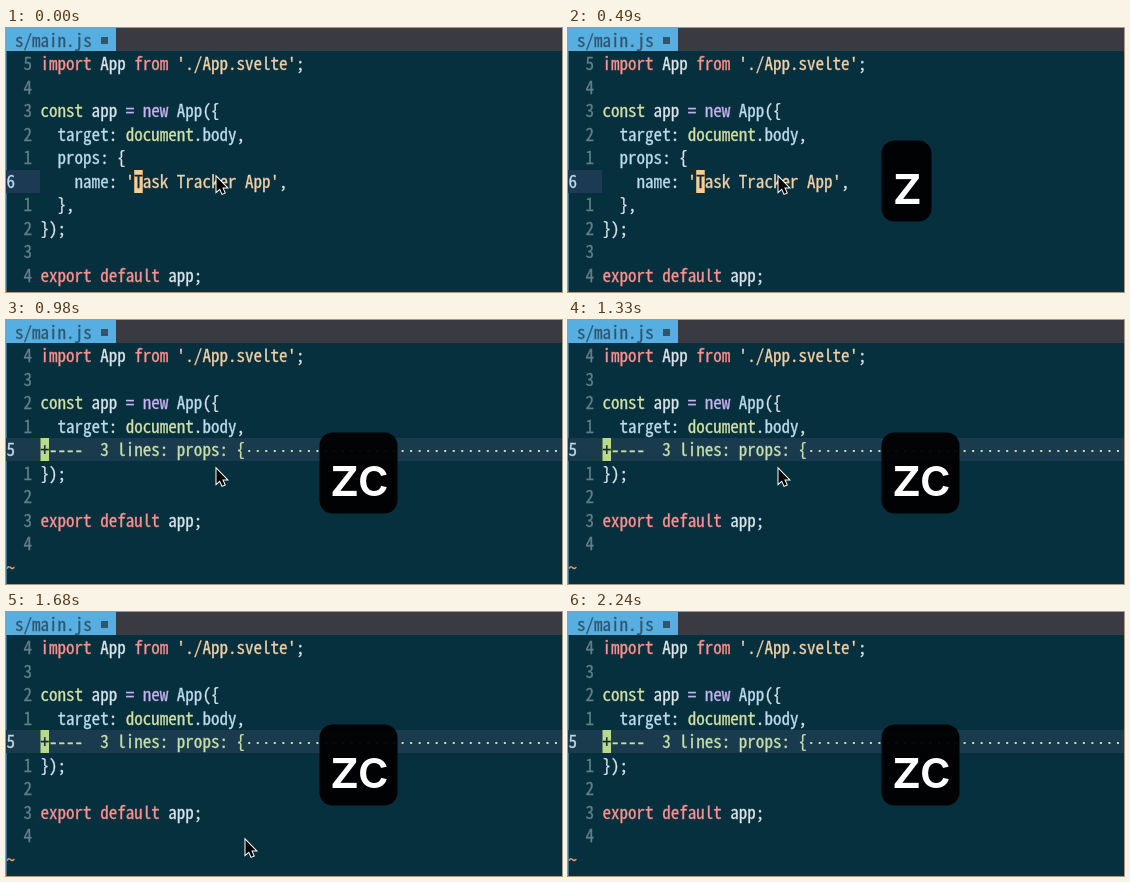
An HTML page with a canvas for the animation above (2.38 s loop, 556x264 px).

```html
<!DOCTYPE html>
<html lang="en">
<head>
<meta charset="utf-8">
<style>
html, body { margin: 0; height: 100%; overflow: hidden; background: #07303f; }
canvas { display: block; }
</style>
</head>
<body>
<canvas id="stage" width="556" height="264"></canvas>
<script>
const ctx = document.getElementById('stage').getContext('2d');
const LOOP = 2380, STEP = 70, CELL = 8.52, ROW = 23.5, LEFT = 34.5, TOP = 24.5;
const KEY_Z = 280, KEY_ZC = 560;

const colors = {
  r: '#ff918e', w: '#dbe4ea', g: '#d3e2a4', o: '#f3d0a4', p: '#c9b2f0',
  b: '#bddbea', n: '#627f8b', f: '#c8e0a8', d: '#10252f', t: '#f0a07a', h: '#2f566d'
};

// Each run of text starts with its colour letter; runs are split by "|".
const head = ["rimport |wApp |rfrom |o'./App.svelte'|w;", '',
  'gconst |wapp |p= new |bApp|w({', 'b  target|w: |gdocument|w.|bbody|w,'];
const tail = ['w});', '', 'rexport default |wapp;'];
const openView = {
  lines: [...head, 'b  props|w: {', "b    name|w: |o'|dT|oask Tracker App'|w,", 'w  },', ...tail],
  current: 5, cursor: [11, '#f5cb98']
};
const foldedView = {
  lines: [...head, 'd+|f----  3 lines: props: {', ...tail, ''],
  current: 4, cursor: [0, '#b9d98c'], folded: true
};

// Pointer stops: time, x, y
const path = [[1330, 210, 148], [1400, 211, 152], [1470, 215, 165], [1540, 222, 185],
  [1610, 231, 208], [1680, 239, 227], [1750, 243, 242], [1820, 245, 252],
  [1890, 247, 258], [1960, 249, 266]];

const family = '"Noto Sans Mono CJK JP", "Noto Sans Mono", monospace';
ctx.font = `100px ${family}`;
const codeFont = `${100 * CELL / ctx.measureText('M').width}px ${family}`;

function rect(x, y, w, h, color) {
  ctx.fillStyle = color;
  ctx.fillRect(x, y, w, h);
}

function write(runs, x, baseline) {
  ctx.font = codeFont;
  ctx.textAlign = 'center';
  ctx.lineWidth = 0.3;
  for (const run of runs.split('|')) {
    ctx.fillStyle = ctx.strokeStyle = colors[run[0]];
    for (const char of run.slice(1)) {
      ctx.fillText(char, x + CELL / 2, baseline);
      ctx.strokeText(char, x + CELL / 2, baseline);
      x += CELL;
    }
  }
}

function drawTabs() {
  rect(0, 0, 556, 23, '#3a3b42');
  rect(0, 0, 110, 23, '#57aee0');
  write('hs/main.js', 9, 19);
  rect(95, 9, 7, 7, colors.h);
}

function drawFoldDots() {
  const start = LEFT + 24 * CELL + CELL / 2 - 1;
  ctx.strokeStyle = colors.f;
  ctx.lineWidth = 2;
  ctx.setLineDash([2, CELL - 2]);
  ctx.beginPath();
  ctx.moveTo(start, 131);
  ctx.lineTo(556, 131);
  ctx.stroke();
  ctx.setLineDash([]);
}

function drawEditor({ lines, current, cursor, folded }) {
  const y = Math.round(TOP + current * ROW - 0.5);
  rect(0, y, folded ? 556 : LEFT - 0.5, 23, folded ? '#1a3b4d' : '#1d3a54');
  rect(LEFT + cursor[0] * CELL, y, CELL, 23, cursor[1]);
  lines.forEach((line, i) => {
    const baseline = TOP + i * ROW + 17.5;
    if (i === current) write('b' + (i + 1), 0.5, baseline);
    else write('n' + Math.abs(i - current), LEFT - 2 * CELL, baseline);
    if (line) write(line, LEFT, baseline);
  });
  if (folded) {
    drawFoldDots();
    write('t~', 0.5, TOP + 9 * ROW + 17.5);
  }
}

function drawKeys(text, width) {
  ctx.fillStyle = 'rgba(0,0,0,.95)';
  ctx.beginPath();
  ctx.roundRect(313.5, 112.5, width, 81, 13);
  ctx.fill();
  ctx.fillStyle = '#fff';
  ctx.font = '500 55px Inter, sans-serif';
  ctx.textAlign = 'center';
  ctx.letterSpacing = '-1.5px';
  ctx.fillText(text, 313.5 + width / 2, 176);
  ctx.letterSpacing = '0px';
}

function drawPointer(t) {
  const [, x, y] = path.findLast(stop => stop[0] <= t) || path[0];
  ctx.save();
  ctx.translate(x + 0.5, y + 1);
  const arrow = new Path2D('M0 0V14.5L3.4 11.4L5.8 16.8L8.1 15.8L5.8 10.6H10.2Z');
  ctx.lineWidth = 2;
  ctx.strokeStyle = '#fff';
  ctx.stroke(arrow);
  ctx.fillStyle = '#000';
  ctx.fill(arrow);
  ctx.restore();
}

function frame(now) {
  const t = Math.floor(now % LOOP / STEP) * STEP;
  rect(0, 0, 556, 264, '#07303f');
  rect(0, 23, 1, 241, '#3f6f83');
  drawEditor(t < KEY_ZC ? openView : foldedView);
  drawTabs();
  if (t >= KEY_ZC) drawKeys('zc', 78);
  else if (t >= KEY_Z) drawKeys('z', 50);
  drawPointer(t);
  requestAnimationFrame(frame);
}
requestAnimationFrame(frame);
</script>
</body>
</html>
```
